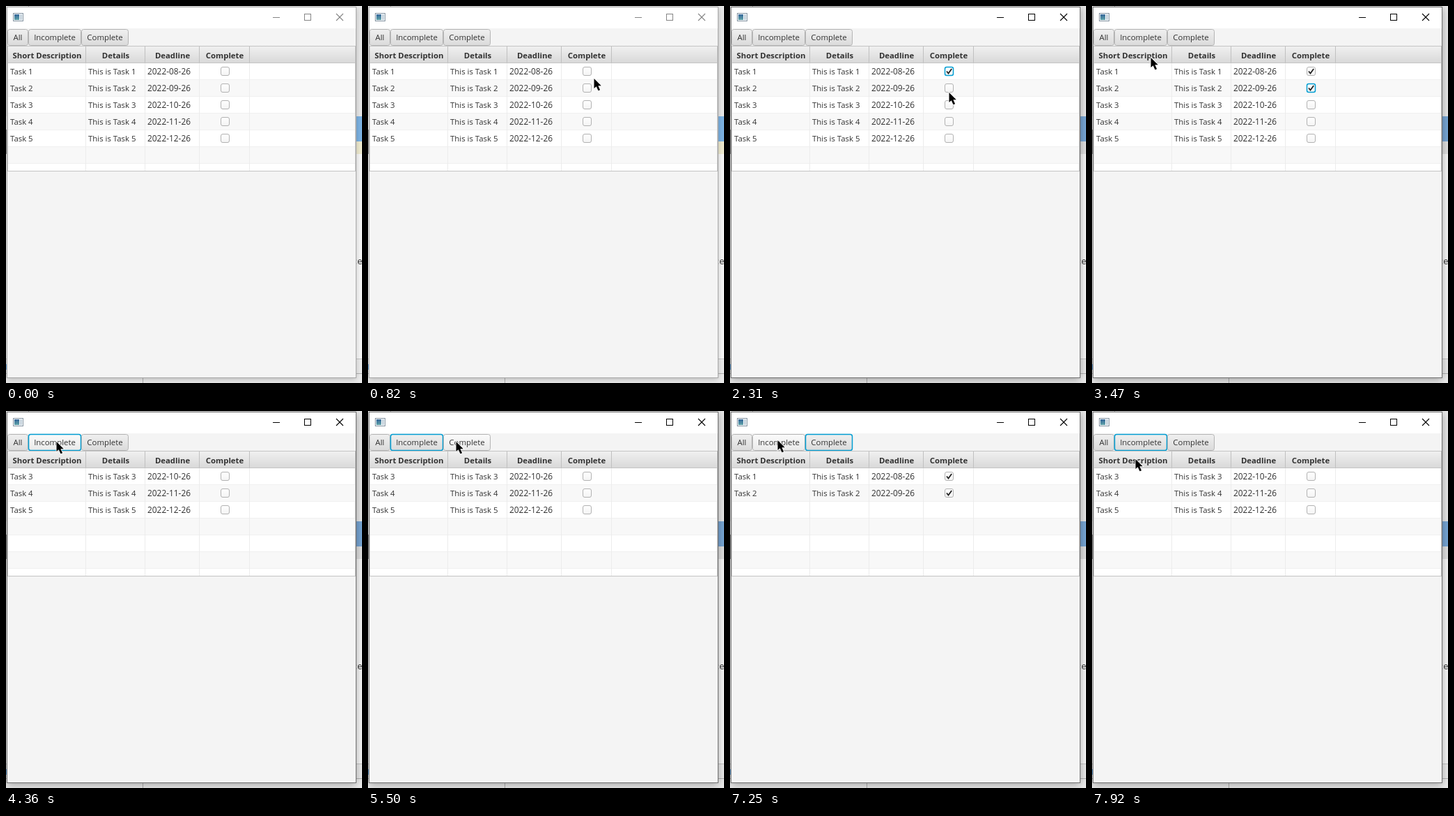
Animation, 511 px wide and 540 px high, one loop 7.99 s. Source, as an HTML page with a canvas:

```html
<!DOCTYPE html>
<html lang="en">
<head>
<meta charset="utf-8">
<title>Task list</title>
<style>
  html, body { margin: 0; width: 100%; height: 100%; overflow: hidden; }
  canvas { display: block; }
</style>
</head>
<body>
<canvas width="511" height="540"></canvas>
<script>
const ctx = document.querySelector('canvas').getContext('2d');
const LOOP = 7990;
const BLUE = '#039ed3';
const INK = '#323232';
const FONT = '"Open Sans", "Noto Sans", sans-serif';

const ACTIVATED = 1090;
const FIRST_CHECKED = 1310;
const SECOND_CHECKED = 2450;

// Each entry holds from its time until the next one.
const focusChanges = [[0, ''], [ACTIVATED, 'Task 1'], [2380, 'Task 2'],
  [3950, 'Incomplete'], [5910, 'Complete'], [7650, 'Incomplete']];
const filterChanges = [[0, 'All'], [4090, 'Incomplete'], [6040, 'Complete'], [7720, 'Incomplete']];

// Pointer path: time, x, y of the tip.
const pointerPath = [
  [260, 438, 526], [400, 396, 340], [540, 360, 215], [680, 336, 138],
  [820, 324, 104], [1030, 321, 95], [1160, 321, 92], [1310, 321, 86],
  [1400, 321, 84], [1630, 317, 113], [1900, 316, 116], [2110, 314, 124],
  [2450, 314, 124], [2750, 255, 140], [3050, 177, 149], [3120, 165, 143],
  [3470, 84, 74], [3700, 74, 50], [3880, 72, 44], [5230, 72, 44],
  [5500, 126, 44], [5640, 141, 42], [6770, 140, 42], [7010, 98, 41],
  [7250, 68, 42], [7720, 68, 43], [7920, 62, 69]
];

const buttons = [
  { label: 'All', x: 2, w: 30 },
  { label: 'Incomplete', x: 32, w: 76 },
  { label: 'Complete', x: 108, w: 68 }
];
const columns = [
  { label: 'Short Description', x: 3, w: 112 },
  { label: 'Details', x: 115, w: 85 },
  { label: 'Deadline', x: 200, w: 78 },
  { label: 'Complete', x: 278, w: 72 }
];
const tasks = [1, 2, 3, 4, 5].map(n => ({
  name: `Task ${n}`,
  details: `This is Task ${n}`,
  deadline: `2022-${String(n + 7).padStart(2, '0')}-26`,
  doneAt: n === 1 ? FIRST_CHECKED : n === 2 ? SECOND_CHECKED : Infinity
}));

const current = (changes, t) => changes.filter(([start]) => start <= t).pop()[1];

function pointerAt(t) {
  if (t < pointerPath[0][0]) return null;
  const next = pointerPath.findIndex(([time]) => time > t);
  if (next < 0) return pointerPath[pointerPath.length - 1].slice(1);
  const [t0, x0, y0] = pointerPath[next - 1];
  const [t1, x1, y1] = pointerPath[next];
  const k = (t - t0) / (t1 - t0);
  return [Math.round(x0 + (x1 - x0) * k), Math.round(y0 + (y1 - y0) * k)];
}

function fill(x, y, w, h, color) {
  ctx.fillStyle = color;
  ctx.fillRect(x, y, w, h);
}

function text(label, x, y, { size = 11.4, weight = 400, align = 'left' } = {}) {
  ctx.font = `${weight} ${size}px ${FONT}`;
  ctx.textAlign = align;
  ctx.fillStyle = INK;
  ctx.fillText(label, x, y);
}

function gradient(y, h, top, bottom) {
  const g = ctx.createLinearGradient(0, y, 0, y + h);
  g.addColorStop(0, top);
  g.addColorStop(1, bottom);
  return g;
}

function rounded(x, y, w, h, radius, paint, border, lineWidth = 1) {
  ctx.beginPath();
  ctx.roundRect(x + 0.5, y + 0.5, w - 1, h - 1, radius);
  ctx.fillStyle = paint;
  ctx.fill();
  ctx.strokeStyle = border;
  ctx.lineWidth = lineWidth;
  ctx.stroke();
}

function polyline(points, color, width) {
  ctx.beginPath();
  points.forEach(([x, y]) => ctx.lineTo(x, y));
  ctx.strokeStyle = color;
  ctx.lineWidth = width;
  ctx.stroke();
}

function drawBackdrop(active) {
  fill(0, 0, 511, 540, '#f8f8f8');
  fill(0, 0, 511, 158, '#e9e9e9');
  fill(32, 0, 1, 2, '#aaa');
  fill(503, 158, 8, 36, active ? '#78a7d6' : '#7cb3e4');
  fill(503, 194, 8, 18, active ? '#e1e1e1' : '#f0ecd0');
  fill(0, 177, 1, 35, '#8c8c8c');
  fill(0, 505, 511, 35, '#ececec');
  fill(0, 505, 511, 1, '#c4c4c4');
  fill(0, 526, 511, 1, '#b0b0b0');
  fill(0, 513, 1, 8, '#6eaee6');
  fill(196, 533, 1, 7, '#b0b0b0');
  ctx.font = '12px "DejaVu Sans Mono", monospace';
  ctx.textAlign = 'left';
  ctx.fillStyle = '#333';
  ctx.fillText('ce', 497, 370);
}

function drawWindow(active) {
  ctx.save();
  ctx.shadowColor = `rgba(0,0,0,${active ? 0.35 : 0.22})`;
  ctx.shadowBlur = active ? 11 : 8;
  ctx.shadowOffsetY = 2;
  fill(1, 1, 502, 532, active ? '#707070' : '#a8a8a8');
  ctx.restore();
  fill(2, 2, 500, 30, '#fff');
  fill(2, 32, 500, 500, '#f4f4f4');

  fill(10, 10, 15, 12, '#8795a2');
  fill(11, 11, 13, 10, '#f4f8fb');
  fill(12, 12, 7, 8, gradient(12, 8, '#35669a', '#5fa3a8'));
  fill(20, 12, 3, 8, '#c6d3dd');

  const color = active ? '#000' : '#858585';
  fill(383, 16, 10, 1, color);
  ctx.strokeStyle = color;
  ctx.lineWidth = 1;
  ctx.strokeRect(428.5, 11.5, 9, 9);
  polyline([[474, 11], [484, 21]], color, 1.1);
  polyline([[484, 11], [474, 21]], color, 1.1);
}

function drawButton({ label, x, w }, focused, pointer) {
  const hover = pointer && pointer[0] >= x && pointer[0] < x + w && pointer[1] >= 33 && pointer[1] < 57;
  const paint = hover ? gradient(33, 24, '#fbfbfb', '#e9e9e9') : gradient(33, 24, '#f0f0f0', '#dadada');
  rounded(x, 33, w, 24, 3, paint, focused ? BLUE : '#b4b4b4', focused ? 1.5 : 1);
  text(label, x + w / 2, 49, { align: 'center' });
}

function drawCheckbox(y, checked, focused) {
  rounded(308, y, 13, 13, 2.5, gradient(y, 13, '#fff', '#f3f3f3'),
    focused ? BLUE : '#b2b2b2', focused ? 1.5 : 1);
  if (checked) polyline([[311, y + 6.5], [313.5, y + 9.5], [318.2, y + 3]], '#222', 1.8);
}

function drawTable(t, focus) {
  fill(2, 57, 500, 180, '#c4c4c4');
  fill(3, 58, 498, 23, gradient(58, 23, '#f0f0f0', '#d9d9d9'));
  for (let row = 0; row < 7; row++) {
    const y = 82 + row * 24;
    const h = Math.min(24, 236 - y);
    fill(3, y, 498, h, row % 2 ? '#f8f8f8' : '#fff');
    if (h === 24) fill(3, y + 23, 498, 1, '#f0f0f0');
  }
  for (const { label, x, w } of columns) {
    fill(x + w - 1, 58, 1, 23, '#c0c0c0');
    fill(x + w - 1, 82, 1, 154, '#ececec');
    text(label, x + w / 2, 75, { size: 11.35, weight: 700, align: 'center' });
  }

  const filter = current(filterChanges, t);
  tasks
    .filter(task => filter === 'All' || (filter === 'Complete') === (t >= task.doneAt))
    .forEach((task, row) => {
      const y = 98 + row * 24;
      text(task.name, 6, y);
      text(task.details, 118, y);
      text(task.deadline, 203, y, { size: 11.9 });
      drawCheckbox(y - 11, t >= task.doneAt, focus === task.name);
    });
}

function drawPointer([x, y]) {
  const outline = [[0, 0], [0, 14], [3.2, 11.2], [6, 17.3], [8.6, 16.2], [5.9, 10.3], [10.3, 10.3]];
  ctx.beginPath();
  outline.forEach(([dx, dy]) => ctx.lineTo(x + 0.5 + dx, y + dy));
  ctx.closePath();
  ctx.strokeStyle = '#fff';
  ctx.lineWidth = 1.6;
  ctx.stroke();
  ctx.fillStyle = '#000';
  ctx.fill();
}

function draw() {
  const t = performance.now() % LOOP;
  const active = t >= ACTIVATED;
  const focus = current(focusChanges, t);
  const pointer = pointerAt(t);
  drawBackdrop(active);
  drawWindow(active);
  buttons.forEach(button => drawButton(button, focus === button.label, pointer));
  drawTable(t, focus);
  if (pointer) drawPointer(pointer);
  requestAnimationFrame(draw);
}
draw();
</script>
</body>
</html>
```
